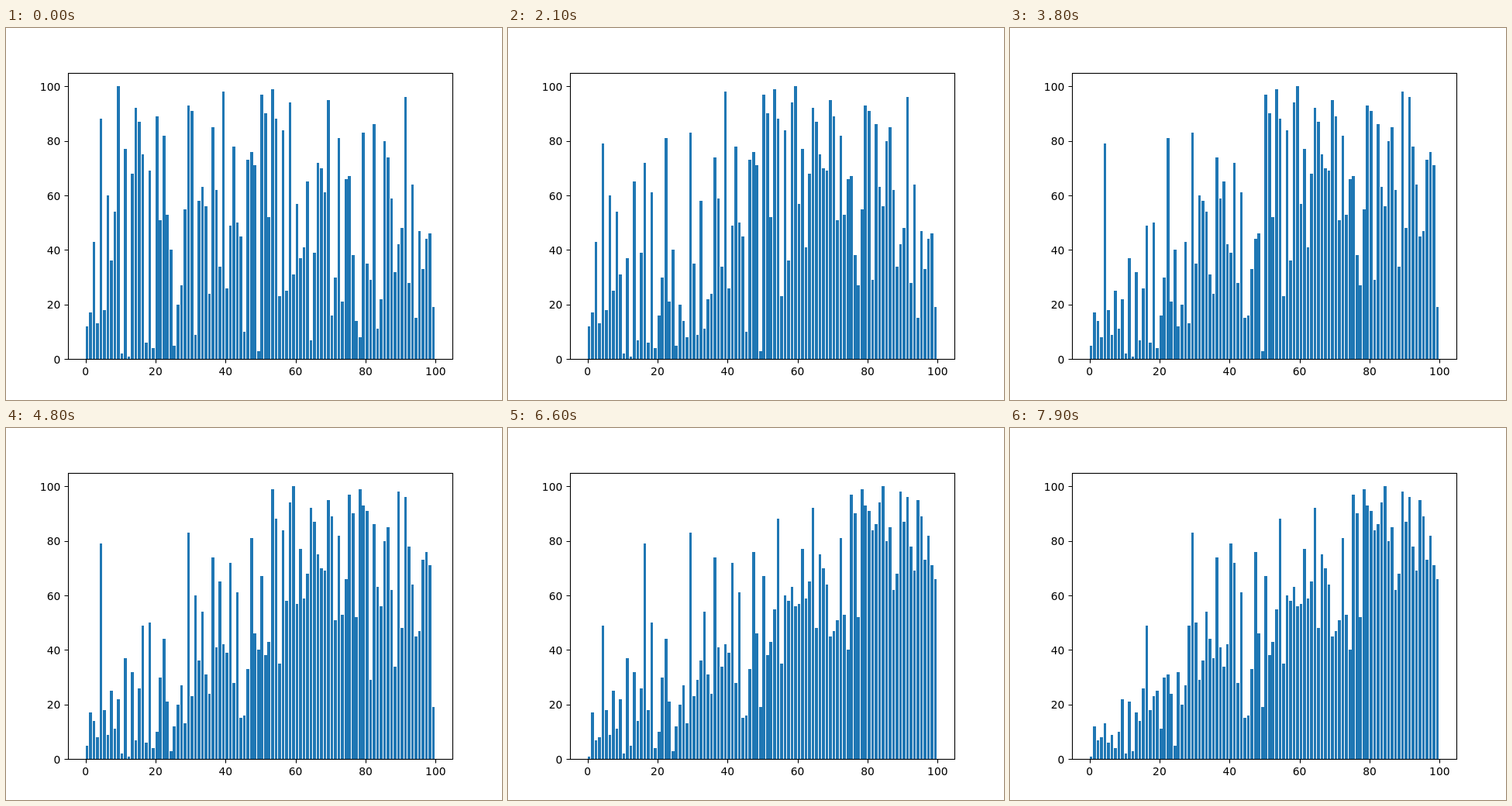
Write an HTML page that moves like this. It is 640 px wide and 480 px high and loops after 8000 ms.

```html
<!DOCTYPE html>
<html lang="en">
<head>
<meta charset="utf-8">
<title>Shell sort</title>
<style>
  html, body { margin: 0; width: 100%; height: 100%; overflow: hidden; background: #fff; }
  svg { display: block; }
  text { font: 13.889px "DejaVu Sans", sans-serif; }
  #bars { fill: #1f77b4; }
  #axes { fill: none; stroke: #000; stroke-width: 1.111; }
</style>
</head>
<body>
<svg width="640" height="480" viewBox="0 0 640 480">
  <path id="bars"/>
  <g id="axes">
    <path id="ticks"/>
    <rect x="80.5" y="58.5" width="496" height="369"/>
  </g>
  <g id="labels"></g>
</svg>
<script>
const STEP = 100, STEPS = 80;
const start = [
  12, 17, 43, 13, 88, 18, 60, 36, 54, 100, 2, 77, 1, 68, 92, 87, 75, 6, 69, 4,
  89, 51, 82, 53, 40, 5, 20, 27, 55, 93, 91, 9, 58, 63, 56, 24, 85, 62, 34, 98,
  26, 49, 78, 50, 45, 10, 73, 76, 71, 3, 97, 90, 52, 99, 79, 23, 84, 25, 94, 31,
  57, 37, 41, 65, 7, 39, 72, 70, 61, 95, 16, 30, 81, 21, 66, 67, 38, 14, 8, 83,
  35, 29, 86, 11, 22, 80, 74, 59, 32, 42, 48, 96, 28, 64, 15, 47, 33, 44, 46, 19
];

const $ = id => document.getElementById(id);
const xAt = v => 80 + (v + 4.99) * 496 / 109.78;
const yAt = v => 427.2 - 3.52 * v;

// Shell sort that pauses after every shift, before the held value is put back.
function* shellSort(a) {
  for (let gap = a.length >> 1; gap; gap >>= 1) {
    for (let i = gap; i < a.length; i++) {
      const held = a[i];
      let j = i;
      for (; j >= gap && a[j - gap] > held; j -= gap) {
        a[j] = a[j - gap];
        yield a;
      }
      a[j] = held;
    }
  }
}

function barPath(values) {
  return values.map((v, i) => {
    const left = Math.round(xAt(i)), right = Math.round(xAt(i + 0.8));
    return `M${left} 427V${Math.round(yAt(v))}H${right}V427Z`;
  }).join("");
}

function addLabel(value, x, y, anchor) {
  const label = document.createElementNS("http://www.w3.org/2000/svg", "text");
  label.setAttribute("x", x);
  label.setAttribute("y", y);
  label.setAttribute("text-anchor", anchor);
  label.textContent = value;
  $("labels").append(label);
}

let ticks = "";
for (let v = 0; v <= 100; v += 20) {
  const x = xAt(v), y = yAt(v);
  ticks += `M${Math.round(x) + 0.5} 427.5v5M80.5 ${Math.round(y) + 0.5}h-5`;
  addLabel(v, x, 448, "middle");
  addLabel(v, 70.3, Math.round(y + 5.5), "end");
}
$("ticks").setAttribute("d", ticks);

const sorter = shellSort([...start]);
const paths = Array.from({ length: STEPS }, () => barPath(sorter.next().value));

let shown = -1;
function draw() {
  const step = Math.floor(performance.now() / STEP) % STEPS;
  if (step !== shown) $("bars").setAttribute("d", paths[shown = step]);
  requestAnimationFrame(draw);
}
draw();
</script>
</body>
</html>
```
